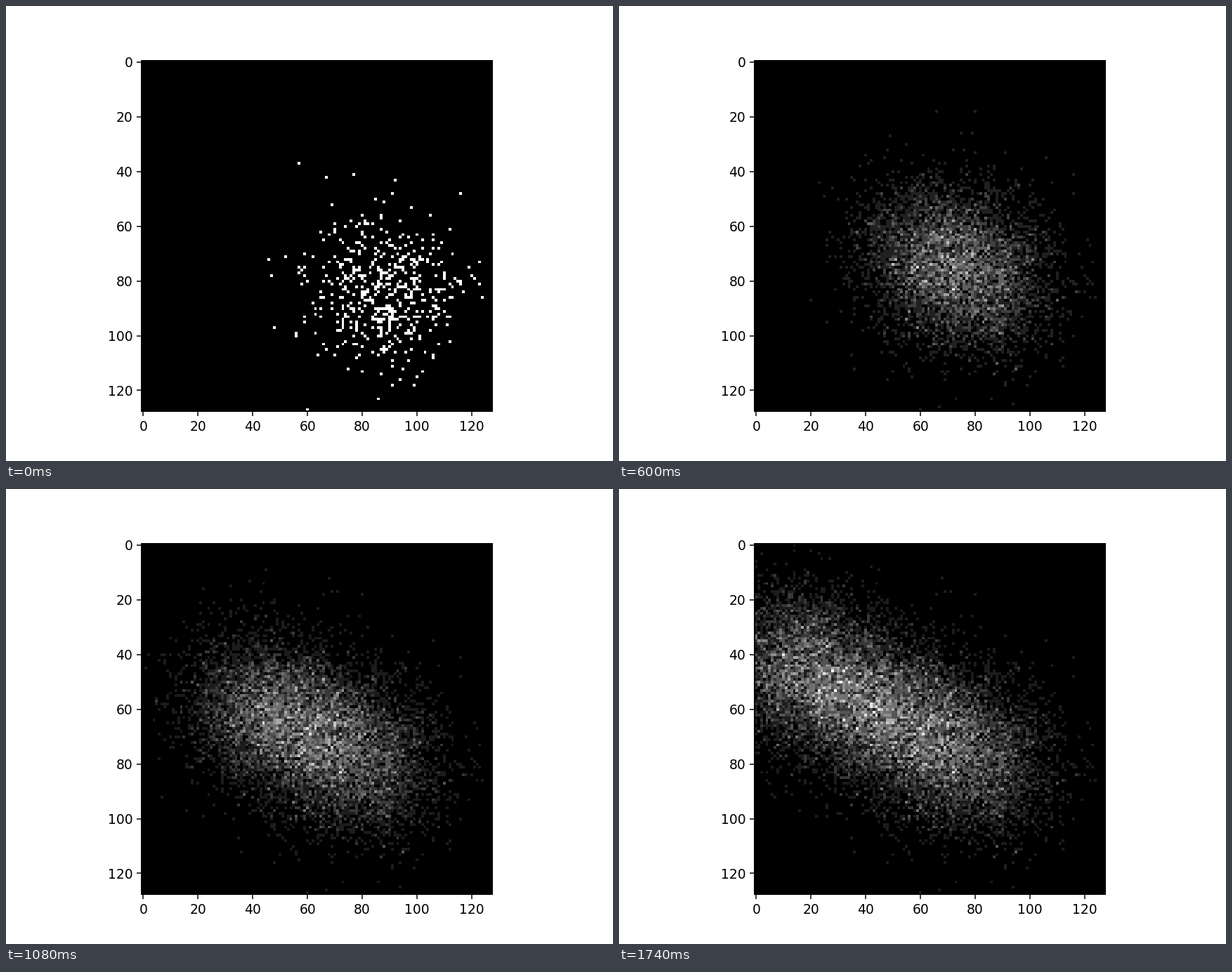
Write a matplotlib script that moves like this. It is 864 px wide and 648 px high and loops after 1.8 s.

```python
import matplotlib.pyplot as plt
import numpy as np
from matplotlib.animation import FuncAnimation

SIZE = 128
STEPS = 30
HITS = 510
SIGMA = 13.8
START = np.array([87.5, 82.8])
DRIFT = np.array([-2.9, -1.55])
DPI = 135

rng = np.random.default_rng(3)


def burst(step):
    """Binary map of the cells hit in one step."""
    center = START + step * DRIFT
    pts = np.rint(rng.normal(center, SIGMA, (HITS, 2))).astype(int)
    pts = pts[((pts >= 0) & (pts < SIZE)).all(axis=1)]
    grid = np.zeros((SIZE, SIZE))
    grid[pts[:, 1], pts[:, 0]] = 1
    return grid


def peak(step):
    """Count shown as white; levels off as the cloud moves on."""
    return round(9.5 - 8.5 * np.exp(-step / 6.5))


counts = np.cumsum([burst(i) for i in range(STEPS)], axis=0)

plt.rcParams["axes.linewidth"] = 2 * 72 / DPI  # two whole pixels
fig, ax = plt.subplots(figsize=(6.4, 4.8), dpi=DPI)
image = ax.imshow(counts[0], cmap="gray", vmin=0, vmax=1,
                  interpolation="nearest")


def update(step):
    image.set_data(counts[step])
    image.set_clim(0, peak(step))
    return (image,)


anim = FuncAnimation(fig, update, frames=STEPS, interval=60,
                     repeat=True, repeat_delay=0)
plt.show()
```
